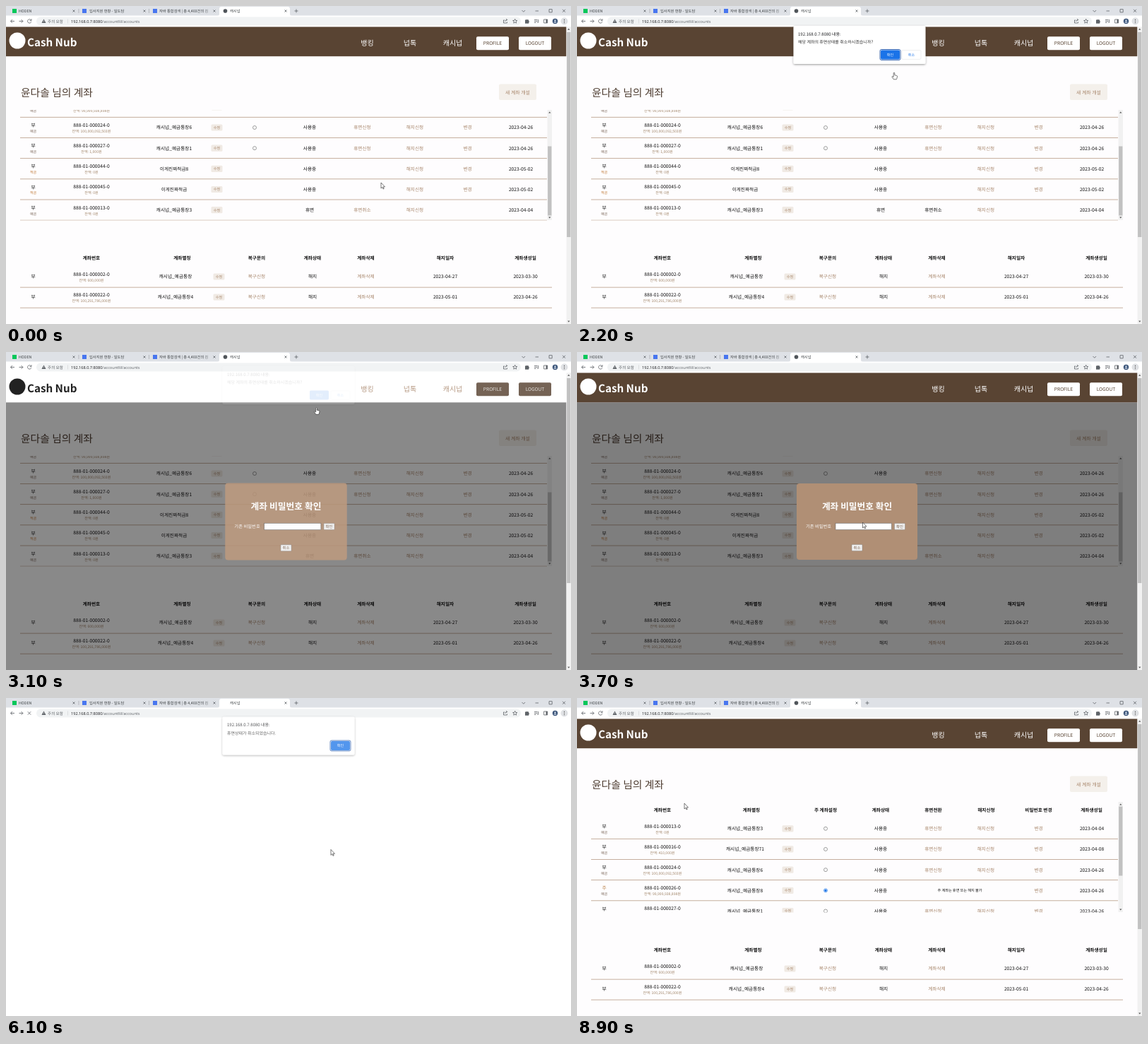
An HTML page for the animation above (9 s loop, 800 by 450 pixels).

```html
<!DOCTYPE html>
<html>
<head>
<meta charset="utf-8">
<title>캐시넙</title>
<style>
html, body { margin: 0; width: 100%; height: 100%; overflow: hidden; background: #fff; }
svg { display: block; width: 100vw; height: 100vh; }
text {
  font-family: "Noto Sans CJK KR", "Noto Sans CJK", "Noto Sans", sans-serif;
  font-weight: 500; text-anchor: middle; text-rendering: geometricPrecision; white-space: pre;
}
.s { text-anchor: start; }
.b { font-weight: 700; }
.r { font-weight: 400; }
.url { font-family: "Open Sans", "Noto Sans", sans-serif; font-weight: 400; text-anchor: start; }
.i { fill: none; stroke: #5f6368; stroke-width: .8; }
</style>
</head>
<body>
<svg id="stage" viewBox="0 0 800 450"></svg>
<script>
const BROWN = '#594433', TAN = '#a8876c', INK = '#111';

// y is the vertical middle of the line
const text = (x, y, s, size = 6.67, fill = INK, cls = '') =>
  `<text x="${x}" y="${y + size * .37}" font-size="${size}" class="${cls}" style="fill:${fill}">${s}</text>`;
const rect = (x, y, w, h, fill, more = '') =>
  `<rect x="${x}" y="${y}" width="${w}" height="${h}" style="fill:${fill}" ${more}/>`;
const dot = (x, y, r, fill, more = '') => `<circle cx="${x}" cy="${y}" r="${r}" style="fill:${fill}" ${more}/>`;
const icon = (d, more = '') => `<path class="i" d="${d}" ${more}/>`;
const group = (id, body, more = '') => `<g id="${id}" ${more}>${body}</g>`;
const cross = (x, y, r) => icon(`M${x - r} ${y - r}l${2 * r} ${2 * r}m0 ${-2 * r}l${-2 * r} ${2 * r}`);
const line = (y, x2) => rect(20, y, x2 - 20, .8, '#b89c86');

function scrollbar(x, w, top, bottom, from, to) {
  const c = x + w / 2;
  return rect(x, top, w, bottom - top, '#f1f1f1') + rect(x + .6, from, w - 1.2, to - from, '#c1c1c1') +
    `<path fill="#505050" d="M${c - 1.6} ${top + 4.4}h3.2l-1.6 -1.9zM${c - 1.6} ${bottom - 4.4}h3.2l-1.6 1.9z"/>`;
}

function browser() {
  const closes = [96, 196, 295, 396].map(x => cross(x, 7, 1.5)).join('');
  const tab = (x, s) => text(x, 7, s, 5.3, '#3c4043', 's r');
  return rect(0, 0, 800, 14, '#dee1e6') +
    '<path fill="#fff" d="M299 14q3 0 3 -3v-7q0 -3 3 -3h94q3 0 3 3v7q0 3 3 3z"/>' + rect(0, 13.5, 800, 15.8, '#fff') +
    rect(9, 4, 6, 6, '#03c75a') + rect(108, 4, 6, 6, '#4876ef') + rect(208, 4, 6, 6, '#4876ef') +
    group('favicon', dot(310.5, 7, 2.8, '#50555a')) +
    tab(18, 'HODEN') + tab(118, '입사지원 현황 - 일도담') + tab(217, '자바 통합검색 | 총 4,403건의 검') +
    rect(280, 2, 12, 10, 'url(#fade)') + tab(317, '캐시넙') + closes +
    icon('M202.5 4v6M103 4v6', 'opacity=".4"') +
    icon('M408.5 7h5M411 4.5v5M730.5 6l2.3 2.3l2.3 -2.3M749.5 7h4.5M769 4.7h4.2v4.2h-4.2z') + cross(790, 6.8, 2) +
    icon('M12 21.5h-5.5M9 19l-2.5 2.5l2.5 2.5M18.5 21.5h5.5M21.5 19l2.5 2.5l-2.5 2.5') +
    group('reload', icon('M35.5 20a2.7 2.7 0 1 0 .3 2.3M36 18.3v2.4h-2.4')) +
    group('stop', cross(33, 21.5, 2.2)) +
    rect(43, 15.6, 686, 11.8, '#f1f3f4', 'rx="5.9"') +
    '<path fill="#5f6368" d="M53.5 18.6l3 5.4h-6z"/>' + rect(53.2, 20.6, .6, 1.8, '#fff') +
    text(59, 21.7, '주의 요함', 5.6, '#5f6368', 's r') + rect(87.3, 18.5, .5, 6, '#c4c7cb') +
    text(92, 21.7, '192.168.0.7:8080<tspan style="fill:#5f6368">/accountM/accounts</tspan>', 5.6, '#202124', 'url') +
    icon('M706 20h-1.5v4h5v-1.5M706.5 22q.5 -2.5 3 -2.5m-1.3 -1.5l1.5 1.5l-1.5 1.5') +
    icon('M720.7 18.4l.9 2 2.2 .2 -1.7 1.4 .5 2.2 -1.9 -1.1 -1.9 1.1 .5 -2.2 -1.7 -1.4 2.2 -.2z') +
    '<path fill="#5f6368" d="M735 19.6h1.6a1.2 1.2 0 0 1 2.2 0h1.4v1.6a1.1 1.1 0 0 1 0 2.1v1.4h-5.2z"/>' +
    icon('M748 19.5h4.5M748 21.5h4.5M748 23.5h2.5M753.7 19v4.3h-1.5') +
    icon('M761.6 19h5v5h-5z') + rect(764.5, 19, 2, 5, '#5f6368') +
    dot(777.5, 21.5, 3.7, '#3b5478') + dot(777.5, 20.5, 1.2, '#c8d4e4') + rect(775.6, 22.2, 3.8, 1.5, '#c8d4e4', 'rx=".7"') +
    dot(790.5, 21.5, 5, '#dfe1e4') + [19.4, 21.5, 23.6].map(y => dot(790.5, y, .6, '#444')).join('');
}

function header() {
  const button = (x, s) => rect(x, 43.2, 46, 19, 'var(--btn)', 'rx="2"') + text(x + 23, 53, s, 6.67, 'var(--btnText)');
  return rect(0, 29.3, 793.5, 41.9, 'var(--bar)') + dot(16, 49, 11.5, 'var(--logo)') +
    text(30, 51.5, 'Cash Nub', 15.2, 'var(--logo)', 's b') +
    text(511.5, 52, '뱅킹', 10, 'var(--nav)') + text(572, 52, '넙톡', 10, 'var(--nav)') +
    text(632.5, 52, '캐시넙', 10, 'var(--nav)') + button(666, 'PROFILE') + button(726, 'LOGOUT');
}

const edit = (x, y) => rect(x - 8, y - 4.6, 16, 9.2, '#f0eae4', 'rx="1.5"') + text(x, y, '수정', 5.2, TAN);
const account = (y, no, sum) =>
  text(121, y - 3.6, `888-01-0000${no}-0`) + text(121, y + 5, `잔액: ${sum}원`, 5.1, '#a08468');
const headings = (y, list) => list.map(([x, s]) => text(x, y, s, 6.67, INK, 'b')).join('');

// radio: 0 none, 1 empty, 2 chosen
function row(y, no, sum, name, radio, sleep, end, change, date, kind = '예금', status = '사용중') {
  const main = radio == 2;
  return text(38.5, y - 3.4, main ? '주' : '부', 6.67, main ? '#b87f45' : INK) +
    text(38.5, y + 5, kind, 5, kind == '적금' ? '#c07a38' : '#7d6a5c') +
    account(y, no, sum) + text(238, y, name) + edit(298.5, y) +
    (radio ? dot(352, y, 2.5, '#fff', `stroke="${main ? '#1a73e8' : '#767676'}" stroke-width=".7"`) : '') +
    (main ? dot(352, y, 1.6, '#1a73e8') + text(542, y, '주 계좌는 휴면 또는 해지 불가', 5.2) : '') +
    text(430, y, status) + text(504.5, y, sleep, 6.67, sleep == '휴면취소' ? 'var(--sleep)' : TAN) +
    text(579, y, end, 6.67, TAN) + text(653.5, y, change, 6.67, TAN) + text(729, y, '2023-' + date) + line(y + 14.1, 766);
}

const STEP = 29.17, NAME = '캐시넙_예금통장', S = '휴면신청', E = '해지신청', C = '변경';
const rows = (y, list) => list.map((r, i) => row(y + i * STEP, ...r)).join('');
const r24 = ['24', '100,000,092,503', NAME + 6, 1, S, E, C, '04-26'];
const r26 = ['26', '99,999,938,898', NAME + 8, 2, '', '', C, '04-26'];
const r27 = ['27', '1,000', NAME + 1, 1, S, E, C, '04-26'];

function closedRow(y, no, sum, name, end, made) {
  return text(38.5, y, '부') + account(y, no, sum) + text(240, y, name) + edit(301.5, y) +
    text(355, y, '복구신청', 6.67, TAN) + text(434, y, '해지') + text(509.5, y, '계좌삭제', 6.67, TAN) +
    text(622, y, '2023-' + end) + text(735.5, y, '2023-' + made) + line(y + 14.7, 773);
}

function content() {
  const before = rows(172 - STEP, [r26, r24, r27,
    ['44', '0', '이게진짜적금8', 0, '', E, C, '05-02', '적금'],
    ['45', '0', '이게진짜적금', 0, '', E, C, '05-02', '적금'],
    ['13', '0', NAME + 3, 0, '휴면취소', E, '', '04-04', '예금', '휴면']]);
  const after = headings(159, [[121, '계좌번호'], [247, '계좌별칭'], [352, '주 계좌설정'], [430, '계좌상태'],
    [504.5, '휴면전환'], [579.5, E], [653.5, '비밀번호 변경'], [728.5, '계좌생성일']]) +
    rows(184.8, [['13', '0', NAME + 3, 1, S, E, C, '04-04'],
      ['16', '410,000', NAME + 71, 1, S, E, C, '04-08'], r24, r26, r27]);
  return rect(0, 29.3, 800, 421, '#fefdfe') +
    text(21, 123, '윤다솔 님의 계좌', 14.8, '#4d3c30', 's r') +
    rect(698, 110.5, 53, 22.5, '#f4f0eb', 'rx="2"') + text(724.5, 122, '새 계좌 개설', 6.9, TAN) +
    '<g clip-path="url(#list)">' +
    group('before', before + scrollbar(766.5, 6.5, 147, 303, 198.5, 296.5)) +
    group('after', after + scrollbar(766.5, 6.5, 147, 303, 153.5, 251.5)) + '</g>' +
    headings(357, [[121, '계좌번호'], [249.5, '계좌별칭'], [355, '복구문의'], [434, '계좌상태'],
      [509.5, '계좌삭제'], [622, '해지일자'], [735.5, '계좌생성일']]) +
    closedRow(383, '02', '600,000', NAME, '04-27', '03-30') +
    closedRow(412, '22', '100,291,786,000', NAME + 4, '05-01', '04-26');
}

function modal() {
  const button = (x, y, s) => rect(x, y, 15, 9, '#efefef', 'rx=".8" stroke="#767676" stroke-width=".4"') +
    text(x + 7.5, y + 4.5, s, 5.4, '#7d6350');
  return rect(311, 186, 171, 108, '#b08f75', 'rx="4"') +
    text(396.5, 218, '계좌 비밀번호 확인', 12.7, '#fff', 'b') + text(342, 246.8, '기존 비밀번호', 6.3, '#fff') +
    rect(366, 242.2, 79.5, 9.4, '#fff', 'id="field" stroke="#555"') +
    [0, 1, 2, 3].map(i => dot(368.3 + i * 1.8, 247, .8, INK, 'class="pw"')).join('') +
    group('caret', rect(374.6, 243.5, .6, 7, INK)) +
    group('valid', text(396.5, 260.5, '확인가능', 6.2, '#b5dbe6')) +
    button(449.5, 242.4, '확인') + button(389, 272.4, '취소');
}

function dialog(id, message, cancel) {
  const x = cancel ? 430 : 460;
  return group(id, rect(306.5, 28, 187, 54, '#fff', 'rx="2" filter="url(#shadow)"') +
    text(313, 39.5, '192.168.0.7:8080 내용:', 6, '#202124', 's r') + text(313, 51, message, 6, '#333', 's r') +
    rect(x - 1, 61.6, 29, 14.8, 'none', 'rx="2" class="ring" stroke="#174ea6" stroke-width=".9"') +
    rect(x, 62.6, 27, 12.8, '#1a73e8', 'rx="1.6"') + text(x + 13.5, 69, '확인', 5.1, '#fff') +
    (cancel ? rect(460, 62.6, 27, 12.8, '#fff', 'rx="1.6" stroke="#dadce0" stroke-width=".5"') +
      text(473.5, 69, '취소', 5.1, '#1a73e8') : ''));
}

const cursors =
  group('arrow', '<path d="M0 0v8l1.8 -1.7l1.2 2.7l1.2 -.5l-1.2 -2.6h2.5z"/>') +
  group('hand', '<path d="M-.8 .8q.8 -1.4 1.6 0v3l3 .7q.8 .3 .7 1.2l-.6 2.8l-.6 1.3h-4l-2.4 -3.6q.4 -1.2 1.4 -.4l.9 .7z"/>') +
  group('beam', '<path fill="none" stroke="#222" d="M-1.4 -4h2.8M0 -4v8M-1.4 4h2.8"/>');

const svg = document.getElementById('stage');
svg.innerHTML = `<defs>
  <clipPath id="list"><rect x="0" y="147" width="800" height="156.6"/></clipPath>
  <linearGradient id="fade"><stop stop-color="#dee1e6" stop-opacity="0"/><stop offset="1" stop-color="#dee1e6"/></linearGradient>
  <filter id="shadow" x="-10%" y="-20%" width="120%" height="150%">
    <feDropShadow dx="0" dy="1" stdDeviation="1.5" flood-opacity=".4"/></filter>
</defs>` + rect(0, 0, 800, 450, '#fff') +
  group('page', content() +
    group('overlay', rect(0, 71.2, 793.5, 379, '#000', 'opacity=".5"') + group('modal', modal())) +
    header() + scrollbar(793.5, 6.5, 29.3, 450, 37, 327)) +
  browser() + dialog('ask', '해당 계좌의 휴면상태를 취소하시겠습니까?', true) +
  dialog('done', '휴면상태가 취소되었습니다.', false) +
  group('cursor', cursors, 'fill="#fff" stroke="#222" stroke-width=".6"');

const $ = id => document.getElementById(id);
const show = (el, on) => { el.style.display = on ? '' : 'none'; };
const ramp = (t, a, b) => Math.min(1, Math.max(0, (t - a) / (b - a)));
const within = (t, a, b) => t >= a && t < b;
const mix = (a, b, p) => `color-mix(in srgb, ${b} ${p * 100}%, ${a})`;

const path = [
  [0, 531, 250], [100, 531, 250], [200, 530, 250], [300, 530, 251], [1000, 505, 285], [1800, 505, 285],
  [2200, 449, 94], [2600, 443, 69], [3000, 443, 69], [3200, 436, 88], [3700, 404.5, 241], [4000, 404, 246],
  [5700, 440, 252], [5800, 457, 250], [6000, 457, 250], [6500, 472, 72], [6800, 472, 64], [7000, 472, 64],
  [7200, 460.7, 72], [7600, 330, 140], [8200, 330, 140], [8900, 152, 149], [9000, 152, 149]];

function pointer(t) {
  const i = path.findIndex(k => k[0] > t);
  const [t0, x0, y0] = path[i - 1], [t1, x1, y1] = path[i];
  const p = ramp(t, t0, t1);
  return [x0 + (x1 - x0) * p, y0 + (y1 - y0) * p];
}

function setDialog(id, t, open, close) {
  const p = ramp(t, open, open + 200) - ramp(t, close, close + 170);
  const lift = t < close ? 3 : 8.5;
  $(id).style.opacity = p;
  $(id).setAttribute('transform', `translate(0 ${-lift * Math.sqrt(1 - p)})`);
  show($(id).querySelector('.ring'), t < close - 200);
}

function draw(t) {
  const hover = within(t, 2800, 3250);
  const tone = ramp(t, 2850, 3150) - ramp(t, 3250, 3550);
  const vars = {
    bar: hover ? '#fff' : BROWN, logo: hover ? '#222' : '#fff', nav: mix('#fff', TAN, tone),
    btn: mix('#fff', BROWN, tone), btnText: mix(BROWN, '#fff', tone), sleep: within(t, 950, 2800) ? INK : TAN
  };
  for (const k in vars) svg.style.setProperty('--' + k, vars[k]);

  const reloaded = t >= 7100, loading = within(t, 5800, 7100);
  show($('page'), !within(t, 5900, 7100));
  show($('before'), !reloaded);
  show($('after'), reloaded);
  show($('favicon'), !loading);
  show($('reload'), !loading);
  show($('stop'), loading);

  const p = reloaded ? 0 : ramp(t, 2825, 3125), k = 1.1 - .1 * p;
  $('overlay').style.opacity = p;
  $('modal').setAttribute('transform', `translate(396.5 240) scale(${k}) translate(-396.5 -240)`);
  $('field').setAttribute('stroke-width', t < 4000 ? .5 : .9);
  const typed = Math.floor((t - 4200) / 150) + 1;
  document.querySelectorAll('.pw').forEach((el, i) => show(el, i < typed));
  const shift = Math.min(0, Math.max(0, typed) - 4) * 1.8;
  $('caret').setAttribute('transform', `translate(${shift} 0)`);
  show($('caret'), within(t, 4000, 5200) || within(t, 5700, 5800));
  show($('valid'), t >= 4900);

  setDialog('ask', t, 1650, 2950);
  setDialog('done', t, 5950, 7055);

  const kind = within(t, 950, 3200) ? 'hand' : within(t, 3900, 4200) ? 'beam' : 'arrow';
  for (const id of ['arrow', 'hand', 'beam']) show($(id), id == kind);
  show($('cursor'), !within(t, 4200, 5700));
  $('cursor').setAttribute('transform', `translate(${pointer(t)})`);
}

function tick() {
  draw(Math.floor(performance.now() % 9000 / 100) * 100);
  requestAnimationFrame(tick);
}
tick();
</script>
</body>
</html>
```
